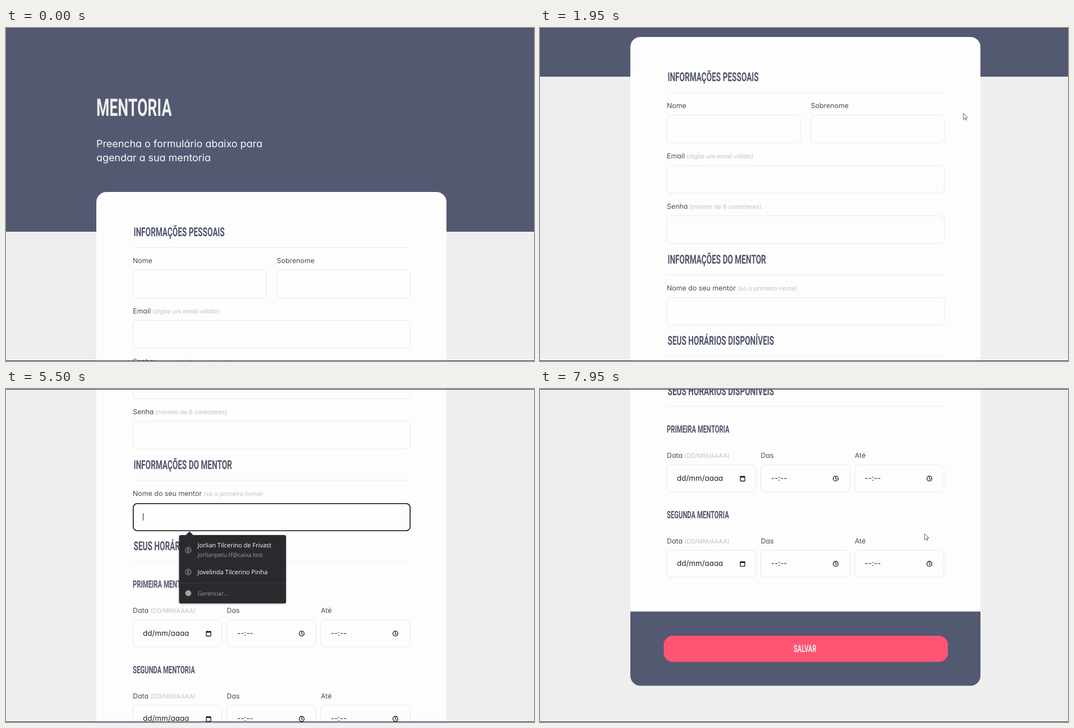
These frames come from a looping animation (941 by 595 pixels, 8 s). An HTML page:

```html
<!DOCTYPE html>
<html lang="pt-BR">
<head>
<meta charset="utf-8">
<title>Mentoria</title>
<style>
html, body { margin: 0; width: 100%; height: 100%; overflow: hidden; background: #eee; }
svg { display: block; width: 941px; height: 595px; }
text { font-family: Inter, "Open Sans", sans-serif; font-feature-settings: "cv11"; text-rendering: geometricPrecision; white-space: pre; }
.heading { font-family: Roboto, "Open Sans", sans-serif; font-weight: 700; fill: #50556d; }
.heading.light { fill: #eee; }
.intro { font-size: 17.9px; fill: #fafafa; }
.label { font-size: 12.4px; fill: #4a4c5e; }
.hint { font-size: 10.8px; fill: #c0bfcd; }
.value { font-size: 13.4px; fill: #222; }
.field { fill: #fdfdfd; stroke: #e7e7ea; }
.rule { stroke: #ececee; }
.popup text { font-family: "Open Sans", "Noto Sans", sans-serif; font-size: 11px; fill: #fff; }
.popup .muted { font-size: 10.3px; fill: #9da0a5; }
.popup { filter: drop-shadow(0 1px 1.5px #0006); }
.icon { fill: none; stroke: #111; stroke-width: 1.3; }
</style>
</head>
<body>
<svg id="stage" viewBox="0 0 941 595"></svg>
<script>
const LOOP = 8000, FRAME = 50, NOTCH = 138.72, BLINK = 475, FIELD_H = 49.5;
const SLATE = '#545972';

const rect = (x, y, w, h, fill, r = 0) =>
  `<rect x="${x}" y="${y}" width="${w}" height="${h}" rx="${r}" fill="${fill}"/>`;
const text = (cls, x, y, str) => `<text class="${cls}" x="${x}" y="${y}">${str}</text>`;

// Condensed display face built from a regular bold one.
const heading = (x, y, size, str, cls = '') =>
  `<text class="heading ${cls}" font-size="${size}" transform="translate(${x} ${y}) scale(.62 1)">${str}</text>`;
const field = (x, y, w, h = FIELD_H) =>
  `<rect class="field" x="${x}" y="${y}" width="${w}" height="${h}" rx="7"/>`;
const rule = y => `<path class="rule" d="M226 ${y}H720.5"/>`;
const section = (y, str) => heading(227.5, y, 22, str) + rule(y + 20.3);

function labelled(x, y, w, label, hintX, hint) {
  return text('label', x, y, label) +
    (hint ? text('hint', hintX, y, hint) : '') + field(x, y + 12.7, w);
}

const clock = (x, y) =>
  `<g class="icon"><circle cx="${x}" cy="${y}" r="4.4"/><path d="M${x} ${y - 3}v3.2l2 1.4"/></g>`;
const calendar = (x, y) =>
  `<g class="icon"><rect x="${x - 4}" y="${y - 3.5}" width="8" height="8" rx=".5"/>` +
  `<path d="M${x - 4} ${y - 2.8}h8" stroke-width="2.2"/><path d="M${x - 2.5} ${y - 5}v2m5-2v2"/></g>`;

function slot(y, title) {
  const top = y + 57.5, base = y + 85.7, mid = y + 81.8;
  const columns = [[226, 'Data'], [393.5, 'Das'], [561, 'Até']];
  return heading(226, y, 18.2, title) +
    columns.map(([x, label]) => text('label', x, y + 45, label) + field(x, top, 159, 48)).join('') +
    text('hint', 257.5, y + 45, '(DD/MM/AAAA)') +
    text('value', 244, base, 'dd/mm/aaaa') + calendar(361, mid) +
    text('value', 412, base, '--:--') + clock(527, mid) +
    text('value', 579, base, '--:--') + clock(694, mid);
}

const person = (x, y) =>
  `<g fill="none" stroke="#a4a7ab"><circle cx="${x}" cy="${y}" r="5"/>` +
  `<circle cx="${x}" cy="${y - 1.3}" r="1.6"/><path d="M${x - 3.2} ${y + 3.6}q3.2-3.2 6.4 0"/></g>`;

// rows: [baseline, class, text]
function popup(id, x, y, w, h, dividerY, iconYs, rows) {
  const tip = x + 18.5, icon = x + 16.3, manageY = rows[rows.length - 1][0];
  return `<g class="popup" id="${id}">` + rect(x, y, w, h, '#292a2d', 3) +
    `<path d="M${tip - 7} ${y + .5}l7-7 7 7z" fill="#292a2d"/>` +
    `<path d="M${x} ${dividerY}h${w}" stroke="#3d3e42"/>` +
    iconYs.map(iy => person(icon, iy)).join('') +
    `<circle cx="${icon}" cy="${manageY - 4.3}" r="5.3" fill="#a0a2a6"/>` +
    rows.map(([ry, cls, str]) => text(cls, x + 33, ry, str)).join('') + '</g>';
}

const FULL_NAME = 'Jorlian Tilcerino de Frivast';
const MAIL = 'jorlianpetu.tf@caixa.test';

document.getElementById('stage').innerHTML =
  rect(0, 0, 941, 595, '#eee') +
  '<g id="page">' +
    rect(0, 0, 941, 364, SLATE) +
    heading(161, 157, 43, 'MENTORIA', 'light') +
    text('intro', 161, 212.5, 'Preencha o formulário abaixo para') +
    text('intro', 161, 238, 'agendar a sua mentoria') +
    rect(161, 293, 624, 1069.3, SLATE, 18) +
    rect(161, 293, 624, 60, '#fdfdfd', 18) +
    rect(161, 320, 624, 909.6, '#fdfdfd') +
    section(372.3, 'INFORMAÇÕES PESSOAIS') +
    labelled(226, 420, 238, 'Nome') +
    labelled(482.5, 420, 238, 'Sobrenome') +
    labelled(226, 510, 494.5, 'Email', 261, '(digite um email válido)') +
    labelled(226, 600, 494.5, 'Senha', 266, '(mínimo de 6 caracteres)') +
    section(697.5, 'INFORMAÇÕES DO MENTOR') +
    labelled(226, 746, 494.5, 'Nome do seu mentor', 352, '(só o primeiro nome)') +
    section(842.8, 'SEUS HORÁRIOS DISPONÍVEIS') +
    slot(910.2, 'PRIMEIRA MENTORIA') +
    slot(1062.6, 'SEGUNDA MENTORIA') +
    rect(220.5, 1273, 506.5, 46.5, '#ff5572', 16) +
    heading(452, 1302, 17.9, 'SALVAR', 'light') +
    '<g id="focus"><rect x="226.8" y=".8" width="493.4" height="48.4" rx="7" fill="none" stroke="#111" stroke-width="1.6"/>' +
    '<rect id="caret" x="244" y="18" width="1" height="13" fill="#222"/></g>' +
  '</g>' +
  popup('mailPopup', 311, 304, 185.5, 90, 357.5, [330], [
    [326, '', MAIL], [342.5, 'muted', FULL_NAME], [380, 'muted', 'Gerenciar...']]) +
  popup('namePopup', 308.5, 261, 190.5, 122, 346.5, [288, 327], [
    [283, '', FULL_NAME], [300, 'muted', MAIL],
    [331, '', 'Jovelinda Tilcerino Pinha'], [369, 'muted', 'Gerenciar...']]) +
  rect(0, 0, 941, 1.1, '#45454d') + rect(0, 594, 941, 1, '#2e3354') +
  '<path id="pointer" d="M.4.4V11.4L2.9 9 4.6 12.7 6.3 11.9 4.6 8.3H8.1Z" fill="#fff" stroke="#3a3a42" stroke-width=".8"/>';

const [page, focus, caret, mailPopup, namePopup, pointer] =
  ['page', 'focus', 'caret', 'mailPopup', 'namePopup', 'pointer'].map(id => document.getElementById(id));

// One wheel notch each: [start, duration]
const wheel = [[1175, 250], [1475, 250], [2875, 360], [4825, 175], [5925, 250], [7225, 225]];
// [start, top of the focused field]
const focused = [[2600, 522], [4350, 613], [5500, 759]];
// [time, x, y]
const path = [
  [0, 20, -12], [400, 330, 150], [850, 692, 298], [950, 708, 270], [1050, 721, 225],
  [1700, 750, 165], [1950, 754, 152], [2250, 640, 262], [2900, 600, 270], [3150, 588, 280],
  [3650, 603, 256], [3800, 603, 248], [4350, 603, 238], [4850, 576, 233], [5950, 576, 233],
  [6300, 557, 227], [6400, 557, 227], [6650, 549, 229], [6750, 549, 229], [7050, 546, 235],
  [7600, 546, 235], [7800, 625, 262], [7950, 685, 258], [LOOP, 685, 258]
];
// The arrow is not shown while it rests over an input.
const hidden = [[2250, 2900], [3850, 4950], [5150, 6000]];

const clamp = v => Math.max(0, Math.min(1, v));
const ease = p => p < .5 ? 2 * p * p : 1 - 2 * (1 - p) ** 2;
const popupOpacity = (t, start, fade) => t < start ? 0 : clamp((fade + 180 - t) / 180);

function pointerAt(t) {
  const i = path.findIndex(k => k[0] > t);
  const [t0, x0, y0] = path[i - 1], [t1, x1, y1] = path[i];
  const p = (t - t0) / (t1 - t0);
  return [x0 + (x1 - x0) * p, y0 + (y1 - y0) * p];
}

function render(t) {
  const scroll = NOTCH * wheel.reduce((sum, [start, len]) => sum + ease(clamp((t - start) / len)), 0);
  page.setAttribute('transform', `translate(0 ${-Math.round(scroll)})`);

  const current = focused.filter(([start]) => t >= start).pop();
  focus.style.display = current ? '' : 'none';
  if (current) {
    focus.setAttribute('transform', `translate(0 ${current[1]})`);
    caret.style.display = Math.floor((t - current[0]) / BLINK) % 2 ? 'none' : '';
  }

  mailPopup.style.opacity = popupOpacity(t, 2650, 3050);
  namePopup.style.opacity = popupOpacity(t, 5500, 6050);

  pointer.setAttribute('transform', `translate(${pointerAt(t)})`);
  pointer.style.display = hidden.some(([a, b]) => t >= a && t < b) ? 'none' : '';
}

const begin = performance.now();
function tick() {
  const t = (performance.now() - begin) % LOOP;
  render(Math.floor(t / FRAME) * FRAME);
  requestAnimationFrame(tick);
}
tick();
</script>
</body>
</html>
```
